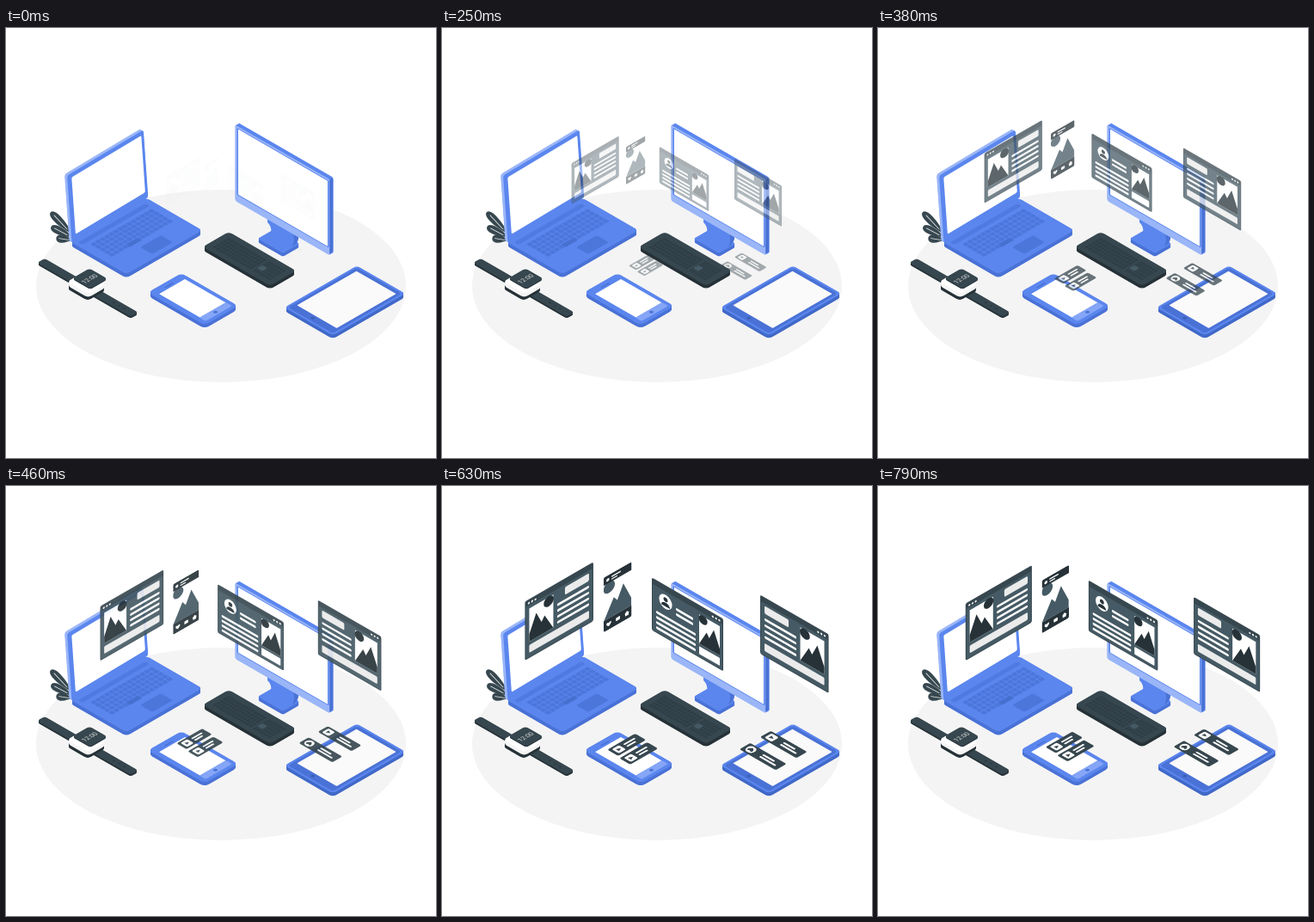
Animation of 500x500 px, one loop 0.83 s. Source, as an HTML page with a canvas:

```html
<!DOCTYPE html>
<html lang="en">
<head>
<meta charset="utf-8">
<title>Devices</title>
<style>
html, body { margin: 0; width: 100%; height: 100%; overflow: hidden; background: #fff; }
canvas { display: block; width: 500px; height: 500px; }
</style>
</head>
<body>
<canvas id="stage" width="500" height="500"></canvas>
<script>
const SIZE = 500, LOOP = 830, FRAMES = 20, K = 0.577;
const CENTER_X = 272.5, CENTER_Y = 208.8;
const PEAK = 1.031; // the panels are laid out at their largest scale
const BLUE = '#5b86ee', DEEP = '#4a72d6', MUTED = '#4d76da', PALE = '#9ab6f8';
const INK = '#263238', SLATE = '#37474f', STEEL = '#455a64', LIGHT = '#ebebeb', WHITE = '#fff';

const stage = document.getElementById('stage').getContext('2d');
let g;

// Isometric planes: lying flat, its mirror image, and the two upright walls
const flat = (x, y) => [1, -K, 1, K, x, y];
const flatMirror = (x, y) => [1, K, 1, -K, x, y];
const rightWall = (x, y) => [1, K, 0, 1, x, y];
const leftWall = (x, y) => [1, -K, 0, 1, x, y];
const leftWallMirror = (x, y) => [-1, K, 0, 1, x, y];

function layer(draw) {
  const canvas = document.createElement('canvas');
  canvas.width = canvas.height = SIZE;
  g = canvas.getContext('2d');
  if (draw) draw();
  return canvas;
}

function within(matrix, draw) {
  g.save();
  g.transform(...matrix);
  draw();
  g.restore();
}

function box(color, x, y, w, h, r = 0) {
  g.beginPath();
  g.roundRect(x, y, w, h, r);
  g.fillStyle = color;
  g.fill();
}

function dot(color, x, y, rx, ry = rx) {
  g.beginPath();
  g.ellipse(x, y, rx, ry, 0, 0, Math.PI * 2);
  g.fillStyle = color;
  g.fill();
}

function shape(color, path) {
  g.fillStyle = color;
  g.fill(new Path2D(path));
}

// A rounded plate whose rounded corners still reach the corners of w by h
function plate(color, w, h, r) {
  const grow = r * (1 - Math.SQRT1_2);
  box(color, -grow, -grow, w + 2 * grow, h + 2 * grow, r);
}

function solid(matrix, dx, dy, w, h, r, top, side, details) {
  const steps = 2 * Math.ceil(Math.hypot(dx, dy));
  const [a, b, c, d, x, y] = matrix;
  for (let i = steps; i > 0; i--)
    within([a, b, c, d, x + dx * i / steps, y + dy * i / steps], () => plate(side, w, h, r));
  within(matrix, () => {
    plate(top, w, h, r);
    if (details) details();
  });
}

const slab = (x, y, w, h, depth, r, top, side, details) =>
  solid(flat(x, y), 0, depth, w, h, r, top, side, details);

function keys(color, x, y, w, h, cols, rows) {
  const dx = w / cols, dy = h / rows;
  for (let i = 0; i < cols; i++)
    for (let j = 0; j < rows; j++) box(color, x + i * dx, y + j * dy, dx - 0.8, dy - 0.8, 0.5);
}

function leaf(x, y, length, angle, width) {
  g.save();
  g.translate(x, y);
  g.rotate(angle);
  g.scale(length, width);
  shape(SLATE, 'M0 0C.3 -.2 .5 -.7 .8 -.6C1.05 -.5 1.05 .4 .8 .5C.5 .6 .3 .4 0 0Z');
  g.restore();
  g.save();
  g.translate(x, y);
  g.rotate(angle);
  box('#e4e8ea', length * 0.25, -0.6, length * 0.6, 0.8, 0.4);
  g.restore();
}

function plant() {
  for (let i = 0; i < 3; i++) leaf(78, 247 - i * 3, 20 + i * 9, Math.PI * (1.05 + i * 0.105), 8);
}

function laptop() {
  solid([1, -0.6, 0.07, 1, 72, 172], -3, -1.5, 87, 77, 3, BLUE, PALE, () => box(WHITE, 4, 4, 81, 66, 1.5));
  slab(77, 248.5, 86, 63, 4.5, 4, BLUE, DEEP, () => {
    box('#507ae0', 3, 4, 78, 5, 2);
    keys(MUTED, 8, 13, 72, 26, 14, 5);
    box('#4770d0', 28, 34, 14, 5, 0.5);
    box(MUTED, 34, 45, 24, 14, 2);
  });
}

function monitor() {
  slab(294, 245, 18, 28, 4, 2, BLUE, DEEP);
  shape(BLUE, 'M304 219L338 238C342 244 339 249 333 253L308 239C309 234 308 230 304 226Z');
  shape(DEEP, 'M331 234L338 238C342 244 340 250 333 254C337 247 335 240 331 234Z');
  solid(rightWall(267, 113.5), 4, -2.3, 109, 87, 2, PALE, BLUE, () => {
    box(BLUE, 1.5, 1.5, 107, 78, 1);
    box(WHITE, 3, 2.5, 104, 76, 0.5);
  });
  within([1, -K, 0, 1, 376, 176.5], () => box(DEEP, 0.2, 0, 3.8, 86, 1));
}

function watch() {
  slab(38, 273, 7, 107, 2, 3, SLATE, INK, () => {
    for (let i = 0; i < 3; i++) dot(INK, 3.5, 84 + i * 6, 0.8);
  });
  slab(73, 300, 19, 22, 3, 4, INK, INK);
  slab(73.5, 295, 18.5, 22, 4.5, 4, WHITE, '#f5f5f5');
  slab(79, 291, 18, 19, 1, 3, SLATE, INK);
  within(flat(91.5, 297.5), () => {
    g.fillStyle = '#e0e0e0';
    g.font = '6.4px Roboto, sans-serif';
    g.fillText('12:00', 0, 0);
  });
}

function phone() {
  slab(168, 307.5, 36, 63, 4, 5, BLUE, DEEP, () => {
    box(WHITE, 3.5, 6.5, 30, 47.5, 0.5);
    box('#85a6f6', 3, 54, 31, 7, 2);
    box(DEEP, 13, 3, 10, 1.4, 0.7);
    dot(DEEP, 18, 57.5, 1.8);
  });
}

function tablet() {
  slab(326, 325, 82, 54, 4, 4, BLUE, '#4169c8', () => {
    box(DEEP, 1, 1, 80, 52, 3);
    box('#fafafa', 8.5, 4, 69, 46, 0.5);
    dot('#3b60b8', 4.7, 26, 1.8);
  });
}

function keyboard() {
  const tint = '#2f3e46';
  slab(231, 254.5, 28, 76, 4, 4, SLATE, INK, () => {
    keys(tint, 4, 5, 20, 45, 5, 13);
    keys(tint, 4, 52, 20, 20, 5, 7);
    box(STEEL, 9, 52, 6, 6, 0.5);
  });
}

function lines(x, y, w, count, gap) {
  for (let i = 0; i < count; i++) box(WHITE, x, y + i * gap, w, 2.9, 1.2);
}

function picture(x, y, w, h, color) {
  within([w, 0, 0, h, x, y], () => {
    box(WHITE, 0, 0, 1, 1);
    shape(color, 'M0 1L.36 .48L.49 .62L.71 .25L1 .78V1Z');
  });
  dot(color, x + w * 0.19, y + h * 0.12, w * 0.21);
}

function frame(w, h) {
  box(SLATE, 0, 0, w, h, 2);
  box(STEEL, 1, 7, w - 2, h - 8, 1);
  for (let i = 0; i < 3; i++) dot(WHITE, w - 4.6 - i * 3.8, 4.5, 1.15);
}

function articleWindow() {
  frame(79.5, 68.5);
  box(LIGHT, 5, 10, 28, 9, 1.5);
  lines(5, 24.3, 37, 4, 6.8);
  picture(46.5, 11, 28, 38.5, INK);
  box(LIGHT, 5, 53.5, 69.5, 9, 1.2);
}

function profileWindow() {
  frame(83, 61);
  dot(WHITE, 16, 19, 7.6, 8.2);
  dot(INK, 16, 16.5, 2.5);
  shape(INK, 'M11 24.5C11 18.5 21 18.5 21 24.5Z');
  lines(28, 13, 13, 1);
  lines(28, 19, 20, 2, 6);
  lines(5, 35.5, 46, 4, 6);
  picture(55, 11, 24, 34, INK);
  box(WHITE, 55, 48, 24, 9, 0.8);
}

function heart(color, x, y) {
  within([1, 0, 0, 1, x, y], () => shape(color, 'M0 2.6C-5-.6-2.2-3.8 0-1.2C2.2-3.8 5-.6 0 2.6Z'));
}

function mobileWindow() {
  g.beginPath();
  g.roundRect(0, 0, 32.5, 63.5, 2);
  g.clip();
  picture(0.4, 9.5, 31.7, 41, STEEL);
  box(INK, 0, 0, 32.5, 9.5);
  box(INK, 0, 50.5, 32.5, 13);
  dot(WHITE, 4.8, 5.2, 1.8);
  box(WHITE, 9, 3, 11, 1.5, 0.7);
  box(WHITE, 9, 6, 7, 1.4, 0.7);
  heart(WHITE, 6, 57);
  box(WHITE, 14.2, 55, 4.8, 3.8, 0.8);
  shape(WHITE, 'M24 57L27 54L30 57H29V59.5H25V57Z');
}

function card(w, icon) {
  const mid = 5.7, start = w * 0.45;
  plate(SLATE, w, 2 * mid, 2);
  icon(6.5, mid);
  box(WHITE, start, 3, w - start - 4, 1.9, 0.9);
  box(WHITE, start, 6.6, (w - start) * 0.6, 1.9, 0.9);
}

function play(x, y) {
  box(WHITE, x - 4.2, y - 4.2, 8.4, 8.4, 1.6);
  within([1, 0, 0, 1, x, y], () => shape(SLATE, 'M-1.7-2L2.4 0L-1.7 2Z'));
}

function like(x, y) {
  dot(WHITE, x, y, 4.5);
  heart(SLATE, x, y);
}

function panels() {
  within(leftWallMirror(176, 88.5), articleWindow);
  within(leftWall(188, 106.8), mobileWindow);
  within(rightWall(244, 106.5), profileWindow);
  within(rightWall(370, 126.5), articleWindow);
  within(flat(193.5, 306.5), () => card(31, play));
  within(flat(207.5, 316.5), () => card(31, play));
  within(flatMirror(347, 306), () => card(41, like));
  within(flatMirror(371, 292), () => card(41, play));
}

// cubic-bezier(.36, -.01, .5, 1.38)
function ease(x) {
  const curve = (a, b, u) => 3 * (1 - u) * (1 - u) * u * a + 3 * (1 - u) * u * u * b + u * u * u;
  let lo = 0, hi = 1;
  for (let i = 0; i < 30; i++) {
    const mid = (lo + hi) / 2;
    if (curve(0.36, 0.5, mid) < x) lo = mid; else hi = mid;
  }
  return curve(-0.01, 1.38, (lo + hi) / 2);
}

const scene = layer(() => {
  dot('#f4f4f4', 250, 300, 215, 112);
  plant();
  laptop();
  monitor();
  watch();
  phone();
  tablet();
});
const front = layer(keyboard);
const overlay = layer();

function render(time) {
  // 24 pictures a second, timed to the nearest 10 ms
  const step = Math.min(FRAMES - 1, Math.floor((time % LOOP + 5) * 0.024));
  const progress = ease((step + 1) / FRAMES);
  const scale = (0.5 + 0.5 * progress) / PEAK;

  g = overlay.getContext('2d');
  g.clearRect(0, 0, SIZE, SIZE);
  within([scale, 0, 0, scale, CENTER_X * (1 - scale), CENTER_Y * (1 - scale)], panels);

  stage.fillStyle = WHITE;
  stage.fillRect(0, 0, SIZE, SIZE);
  stage.drawImage(scene, 0, 0);
  stage.globalAlpha = Math.max(0, Math.min(1, progress));
  stage.drawImage(overlay, 0, 0);
  stage.globalAlpha = 1;
  stage.drawImage(front, 0, 0);
}

const start = performance.now();
function tick() {
  render(performance.now() - start);
  requestAnimationFrame(tick);
}
tick();
</script>
</body>
</html>
```
